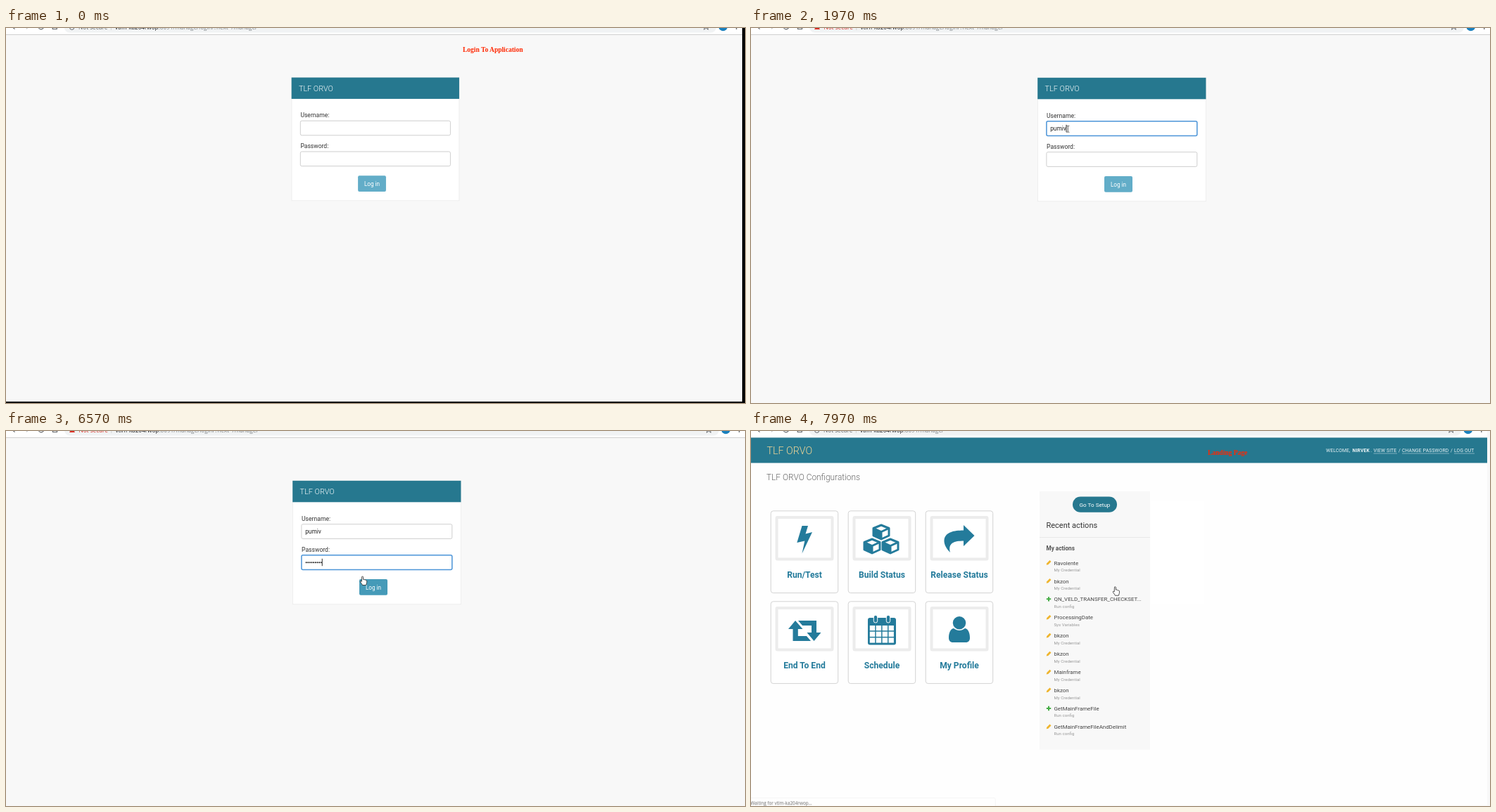
Recreate the animation shown at these times as an HTML page. Size 1050 by 534 pixels, loop 8000 ms.

```html
<!DOCTYPE html>
<html lang="en">
<head>
<meta charset="utf-8">
<title>Login walkthrough</title>
<style>
html, body { margin: 0; width: 100%; height: 100%; overflow: hidden; background: #f8f8f8; }
svg { display: block; width: 100vw; height: 100vh; }
text { font-family: Roboto, sans-serif; white-space: pre; }
.ui { font-family: "Open Sans", sans-serif; }
.note { font: bold 9.5px "Liberation Serif", serif; fill: #ff2600; }
</style>
</head>
<body>
<svg id="stage" viewBox="0 0 1050 534" preserveAspectRatio="none"></svg>
<script>
const LOOP = 8000, SHRINK = 0.9962, TEAL = '#26788f', ICON = '#247b9b';
const USER = 'pumiv', HOST = 'vtlm-ka204rwop', BRAND = 'TLF ORVO';
const USER_KEYS = [1250, 1550, 1650, 1800, 1970];
const PASS_KEYS = [3200, 3530, 3750, 3900, 4130, 5150, 5380, 5610, 5840];
const CUT = 870, TAB = 2420, CLICK = 6790, SUBMIT = 6860, WAIT = 7250, LAND = 7660;

const stage = document.getElementById('stage');

function add(parent, tag, attrs = {}, content) {
  const el = document.createElementNS('http://www.w3.org/2000/svg', tag);
  for (const k in attrs) el.setAttribute(k, attrs[k]);
  if (content !== undefined) el.textContent = content;
  parent.appendChild(el);
  return el;
}
const group = (parent, attrs) => add(parent, 'g', attrs);
const rect = (parent, x, y, width, height, fill, more) =>
  add(parent, 'rect', { x, y, width, height, fill, ...more });
const path = (parent, d, fill, more) => add(parent, 'path', { d, fill, ...more });
const circle = (parent, cx, cy, r, fill, more) => add(parent, 'circle', { cx, cy, r, fill, ...more });
const label = (parent, x, y, size, fill, str, more) =>
  add(parent, 'text', { x, y, 'font-size': size, fill, ...more }, str);
const show = (el, on) => el.setAttribute('display', on ? 'inline' : 'none');
const count = (keys, t) => keys.filter(k => t >= k).length;
const clamp = v => Math.max(0, Math.min(1, v));
const ease = p => p * p * (3 - 2 * p);

const backdrop = rect(stage, 0, 0, 1050, 534, '#000');
const view = group(stage);
rect(view, 0, 0, 1050, 534, '#f8f8f8');

// Browser toolbar, cut off by the top edge
const line = { stroke: '#5f6368', 'stroke-width': 1.2 };
rect(view, 0, 0, 1050, 9, '#fff');
rect(view, 0, 9, 1050, 1, '#cfcfcf');
rect(view, 83, -9, 930, 15.5, '#f1f3f4', { rx: 7.7 });
path(view, 'M13 -4L9 -1.5L12.5 1.6', 'none', line);
path(view, 'M28 -4L32 -1.5L29 1.3', 'none', { ...line, stroke: '#c4c6c8' });
const reload = circle(view, 50, -2, 3.8, 'none', line);
const stop = path(view, 'M46.6 1.6L53.6 -5.4M46.6 -5.4L53.6 1.6', 'none', line);
path(view, 'M66.5 -3V1.5H72.5V-3', 'none', line);
const info = circle(view, 94, -0.8, 3.2, 'none', { ...line, 'stroke-width': 1 });
const warn = path(view, 'M90 2H98L94 -5Z', '#d93025');
const secure = label(view, 103.5, 2, 8.2, '#5f6368', 'Not secure', { class: 'ui' });
rect(view, 149.5, -3, 0.7, 6, '#c8c8c8');
const url = label(view, 155.5, 2, 8.2, '#80868b', '', { class: 'ui' });
add(url, 'tspan', { fill: '#202124' }, HOST);
const urlPath = add(url, 'tspan');
path(view, 'M995.5 2.3L998.5 0.2L1001.5 2.3L1000.6 -1H996.4Z', 'none', { ...line, 'stroke-width': 0.9 });
circle(view, 1022.7, -2.2, 6.4, '#1a80bd');
circle(view, 1041.8, 1, 0.9, '#5f6368');

// Login form
const login = group(view);
rect(login, 407.5, 71, 238.8, 175.8, '#fff', { stroke: '#eaeaea', 'stroke-width': 0.8 });
rect(login, 407.2, 70.8, 239.2, 30.5, TEAL);
label(login, 417.5, 90.2, 10.9, '#f6fafb', BRAND, { 'font-weight': 300 });
label(login, 420, 127.6, 8.6, '#333', 'Username:');
label(login, 420, 171.6, 8.6, '#333', 'Password:');
const field = y => rect(login, 419.9, y, 213.9, 20.7, '#fff', { rx: 2 });
const userBox = field(132.7), passBox = field(176.7);
const userText = label(login, 425.2, 146.2, 8.3, '#222', '');
const dots = PASS_KEYS.map((_, i) => circle(login, 426.6 + 2.64 * i, 187.2, 0.95, '#111'));
const caret = rect(login, 0, 0, 0.9, 10.4, '#111');
const button = rect(login, 502, 211, 40, 22.8, '#62adc8', { rx: 2 });
label(login, 522, 225.6, 8.2, '#fff', 'Log in', { 'text-anchor': 'middle' });

// Landing page
const landing = group(stage);
rect(landing, 0, 9.5, 1046, 523.5, '#fefefe');
rect(landing, 407, 100, 236, 147, '#fff');
rect(landing, 0, 9.5, 1046, 36, TEAL);
label(landing, 22.5, 33, 14.3, '#f0d596', BRAND, { 'font-weight': 300 });
label(landing, 22, 70.2, 11.9, '#666', BRAND + ' Configurations', { 'font-weight': 300 });
const nav = (x, str, more) => label(landing, x, 29.8, 6.7, '#eef6f8', str, { 'letter-spacing': 0.2, ...more });
nav(817, 'WELCOME,');
nav(854.5, 'NIRVEK', { 'font-weight': 700 });
nav(880.3, '.');
[[884.5, 'VIEW SITE', 33.5], [925, 'CHANGE PASSWORD', 67], [999, 'LOG OUT', 29]].forEach(([x, str, w]) => {
  nav(x, str);
  rect(landing, x, 31.7, w, 0.6, '#b9d4dc');
});
nav(920, '/');
nav(994, '/');

function cube(g, x, y) {
  const edge = { stroke: ICON, 'stroke-width': 3, 'stroke-linejoin': 'round' };
  path(g, `M${x} ${y - 10}l11 4.5v10.5l-11 5l-11 -5v-10.5Z`, '#fff', edge);
  path(g, `M${x - 11} ${y - 5.5}L${x} ${y - 0.5}V${y + 10}L${x - 11} ${y + 5}Z`, ICON);
  path(g, `M${x - 11} ${y - 5.5}L${x} ${y - 0.5}L${x + 11} ${y - 5.5}M${x} ${y}V${y + 9}`, 'none', edge);
}
const icons = [
  g => path(g, 'M72.5 135H81L77.5 146.5L87 144L72.5 174.5L76.3 156.5L65.3 159Z', ICON),
  g => [[185, 144], [172, 164], [198, 164]].forEach(p => cube(g, ...p)),
  g => path(g, 'M317.5 149L302 164V156.5C289 156.5 279.5 159 283 173C276.500 166.500 274 160 274.500 155C276 144 288 141.500 302 141.500V134Z', ICON),
  g => {
    path(g, 'M63 270L73.500 282H66.800V292H79L85 299H59.500V282H53Z', ICON);
    path(g, 'M67 270H93V287H99.500L89.500 299L79.500 287H86V277H73Z', ICON);
  },
  g => {
    rect(g, 166, 266, 40, 38.5, ICON, { rx: 3 });
    for (let r = 0; r < 3; r++)
      for (let c = 0; c < 4; c++) rect(g, 168.8 + 8.9 * c, 277 + 8.7 * r, 7.4, 7.2, '#fff');
    [177, 195].forEach(x => rect(g, x - 2.7, 262.5, 5.4, 10.5, ICON, { rx: 2.5, stroke: '#fff', 'stroke-width': 1 }));
  },
  g => {
    path(g, 'M288 281C283 282 281 288 281 294.500C281 298.500 283 301 287 301H305C309 301 311 298.500 311 294.500C311 288 309 282 304 281C299 285 293 285 288 281Z', ICON);
    circle(g, 296, 273.3, 9.2, ICON);
  }
];
['Run/Test', 'Build Status', 'Release Status', 'End To End', 'Schedule', 'My Profile'].forEach((name, i) => {
  const x = 28.2 + 110 * (i % 3), y = 113.8 + 129 * Math.floor(i / 3);
  rect(landing, x, y, 95.5, 116.8, '#fff', { rx: 3.5, stroke: '#cfcfcf', 'stroke-width': 0.9 });
  rect(landing, x + 8.3, y + 9.2, 79, 59.5, '#fff', { rx: 1, stroke: '#ececec', 'stroke-width': 4 });
  icons[i](landing);
  label(landing, x + 47.8, y + 95.6, 12.1, ICON, name, { 'font-weight': 700, 'text-anchor': 'middle' });
});

// Recent actions
rect(landing, 410, 86, 157, 367.5, '#f8f8f8');
rect(landing, 457, 93.5, 63, 22.3, TEAL, { rx: 11.1 });
label(landing, 488.5, 107.6, 8.1, '#fff', 'Go To Setup', { 'text-anchor': 'middle' });
label(landing, 419.5, 138.3, 11, '#333', 'Recent actions');
rect(landing, 410, 151, 157, 1, '#e8e8e8');
label(landing, 419.5, 170.4, 8.2, '#555', 'My actions', { 'font-weight': 700 });
const CRED = 'My Credential', RUN = 'Run config';
[
  ['Ravolente', CRED], ['bkzon', CRED], ['QN_VELD_TRANSFER_CHECKSET...', RUN, true],
  ['ProcessingDate', 'Sys Variables'], ['bkzon', CRED], ['bkzon', CRED], ['Mainframe', CRED],
  ['bkzon', CRED], ['GetMainFrameFile', RUN, true], ['GetMainFrameFileAndDelimit', RUN]
].forEach(([name, kind, isNew], i) => {
  const y = 190.6 + 25.93 * i;
  if (isNew) path(landing, `M423 ${y - 6.3}v6.400M419.800 ${y - 3.1}h6.400`, 'none', { stroke: '#45ad45', 'stroke-width': 2 });
  else path(landing, `M419.700 ${y + 0.2}l.6 -2.500l4.200 -4.200l2 2l-4.200 4.200Z`, '#efb52e');
  label(landing, 430.5, y, 7.9, '#444', name);
  label(landing, 430.5, y + 9.4, 6.1, '#999', kind);
});

const noteIn = add(stage, 'text', { x: 649, y: 34.3, class: 'note' }, 'Login To Application');
const noteOut = add(stage, 'text', { x: 649, y: 34.3, class: 'note' }, 'Landing Page');

// Status bubble
const status = group(stage);
const bubble = rect(status, -3, 524.4, 351.5, 14, '#fff', { rx: 2, stroke: '#cfcfcf', 'stroke-width': 0.9 });
const waiting = 'Waiting for ' + HOST + '...';
label(status, -0.5, 533.9, 6.4, '#666', waiting, { class: 'ui' });
const echo = label(status, -0.5, 534.9, 6.4, '#777', waiting, { class: 'ui', opacity: 0.6 });

// Pointer shapes share one anchor at 0,0
const pointer = group(stage);
const mouse = group(pointer);
const halo = circle(mouse, 0, 0, 7.2, '#f4ee2c', { opacity: 0.8 });
const beam = path(mouse, 'M-2 -4.500H-.5L0 -4L.5 -4.500H2M0 -4V4M-2 4.500H-.5L0 4L.5 4.500H2', 'none',
  { stroke: '#333', 'stroke-width': 0.8 });
const edge = { stroke: '#222', 'stroke-width': 0.8, 'stroke-linejoin': 'round' };
const arrow = path(mouse, 'M0 -5V5.500L2.500 3.200L4.200 7L5.700 6.300L4 2.700H7.200Z', '#fff', edge);
const hand = path(mouse, 'M-1.500 -5.500C-.3 -6.300 .4 -5.600 .4 -4.800V-1.500C2 -2 2.300 -1.300 2.500 -.9C3.500 -1.300 4 -.8 4.200 -.3C5.300 -.6 5.500 .2 5.500 1C5.500 3.500 5 4.500 4.300 6.600H-.7C-1 5.200 -2.500 4 -3.700 1.900C-4.200 .7 -2.900 .2 -1.900 1.500Z', '#fff', edge);

function place(t) {
  if (t < CUT) {
    const p = ease(clamp((t - 70) / 680));
    return [-10 + 460.6 * p, -10 + 153.7 * p];
  }
  const p = ease(clamp((t - 6070) / 690));
  return [450.3 + 69.7 * p, 143.8 + 84.7 * p];
}

function focus(box, on) {
  box.setAttribute('stroke', on ? '#4b94d8' : '#c9c9c9');
  box.setAttribute('stroke-width', on ? 1.5 : 0.9);
}

function draw(t) {
  const intro = t < CUT, landed = t >= LAND, sent = t >= SUBMIT;
  const scale = intro || landed ? `scale(${SHRINK})` : '';
  [view, pointer, status].forEach(g => g.setAttribute('transform', scale));
  backdrop.setAttribute('fill', intro ? '#000' : '#f8f8f8');
  show(noteIn, intro);
  show(noteOut, landed);
  show(landing, landed);
  show(login, !landed);

  const risky = t >= 1320 && !sent;
  show(warn, risky);
  show(info, !risky);
  secure.setAttribute('fill', risky ? '#d93025' : '#5f6368');
  urlPath.textContent = sent ? ':8091/manage/' : ':8091/manage/login/?next=/manage/';
  show(stop, sent && !landed);
  show(reload, !sent || landed);

  const inUser = t >= 770 && t < TAB, inPass = t >= TAB && t < CLICK;
  focus(userBox, inUser);
  focus(passBox, inPass);
  userText.textContent = USER.slice(0, count(USER_KEYS, t));
  const typed = count(PASS_KEYS, t);
  dots.forEach((d, i) => show(d, i < typed));
  const blink = (t >= 2970 && t < 3200) || (t >= 4680 && t < 5150);
  show(caret, (inUser || inPass) && !blink);
  const width = inPass ? 2.64 * typed : userText.textContent ? userText.getComputedTextLength() : 0;
  caret.setAttribute('x', 425 + width);
  caret.setAttribute('y', inPass ? 181.8 : 137.8);

  const [x, y] = place(t);
  const over = y > 211;
  const inText = y < 153.5 || (y > 176 && y < 198);
  mouse.setAttribute('transform', `translate(${x} ${y})`);
  show(mouse, t >= 70);
  show(halo, intro);
  show(beam, intro || inText);
  show(arrow, !intro && !inText && !over);
  show(hand, !intro && over);
  button.setAttribute('fill', over ? '#459ab8' : '#62adc8');
  button.setAttribute('stroke', t >= CLICK ? '#a5cddd' : 'none');

  show(status, t >= WAIT);
  status.setAttribute('opacity', landed ? 0.75 : 1);
  bubble.setAttribute('stroke', landed ? '#f0f0f0' : '#cfcfcf');
  show(echo, t >= 7870);
}

function tick(now) {
  draw(now % LOOP);
  requestAnimationFrame(tick);
}
draw(0);
requestAnimationFrame(tick);
</script>
</body>
</html>
```
